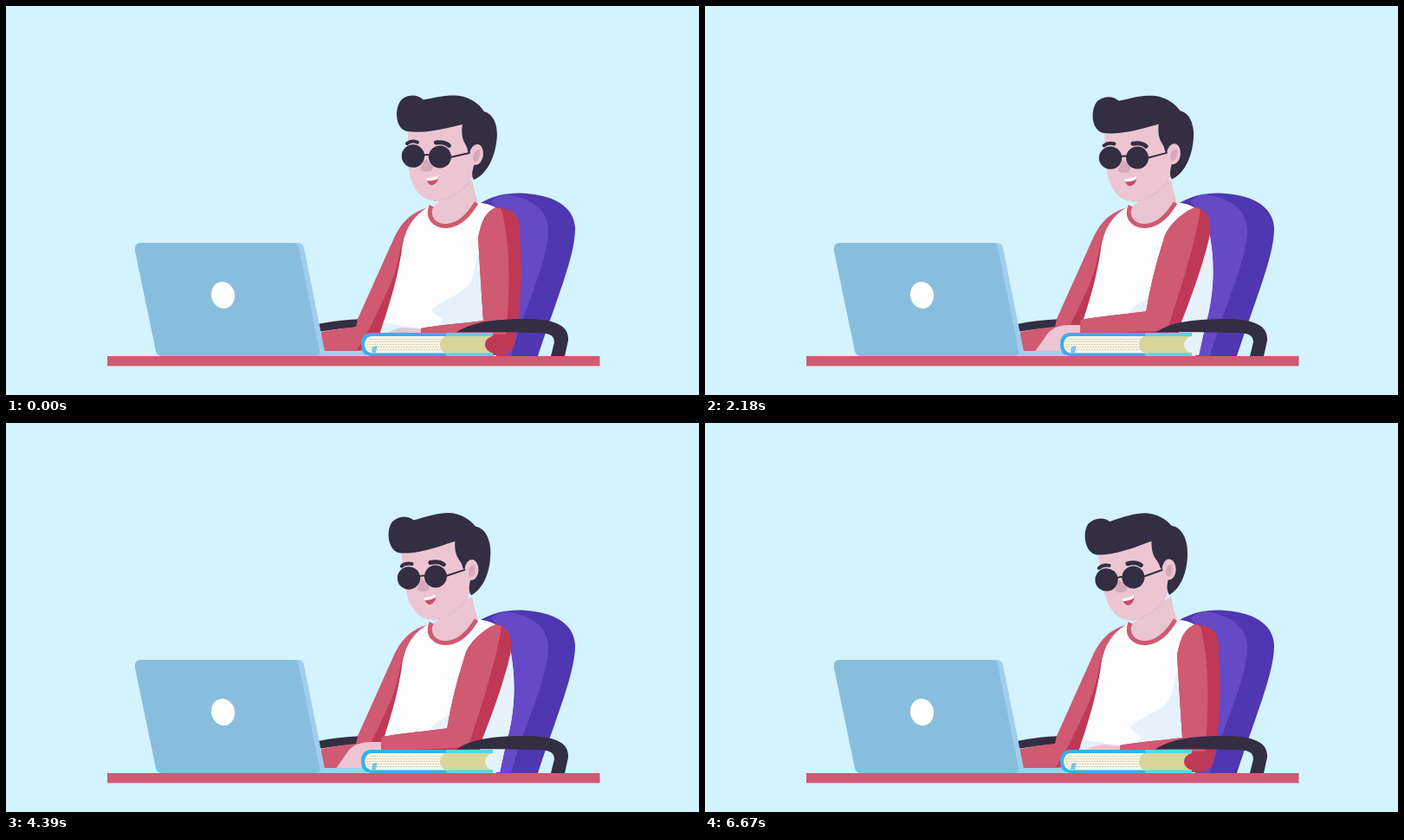
An HTML page that plays this animation: 800x450 px, repeating every 6700 ms.

```html
<!DOCTYPE html>
<html lang="en">
<head>
<meta charset="utf-8">
<title>At the desk</title>
<style>
html, body { margin: 0; width: 100%; height: 100%; overflow: hidden; background: #d3f3fe; }
svg { display: block; width: 100vw; height: 100vh; }
.light { fill: #cf5a72; }
.deep { fill: #be3955; }
.ink { fill: #332e42; }
.skin { fill: #edc5d2; }
.line { fill: none; stroke: #332e42; stroke-linecap: round; }
</style>
</head>
<body>
<svg viewBox="0 0 800 450">
  <!-- chair -->
  <path fill="#4e37b0" d="M546 229C562 219 578 216 595 216.500C633 218 657 233 657 258C657 290 634 343 614 405H566L590 300Z"/>
  <path fill="#6549c6" d="M560 226C566 221 571 219 576 218C608 222 625 236 626 258C627 294 598 350 583 405H566L578 360L568 235Z"/>
  <path class="ink" d="M360 368Q384 363 412 362V371Q384 373 360 377Z"/>

  <!-- far arm -->
  <path class="light" d="M491 232C470 237 458 248 449 266L406 362L404 371Q385 373 364 377V399H408Q422 398 436 376L462 262Z"/>
  <path class="deep" d="M462 260C454 278 454 300 443 324Q428 357 417 378L405 398H432L446 340Z"/>

  <!-- shirt and neck -->
  <path fill="#fdfdfe" d="M492 230C470 241 459 259 456.500 285C450 325 440 352 432 378L560 404H570L577 372C587 338 590 300 581 255Q574 229 543 227Q520 260 492 230Z"/>
  <path fill="#e6f1fc" d="M548 270C540 305 541 315 532 325C518 337 500 342 491 352C496 360 505 358 503 367Q494 371 482 375L550 404H570L577 372C587 338 590 300 582 262Z"/>
  <path fill="#e6f1fc" d="M436 366Q453 369 473 373L433 379Z"/>
  <path fill="#e9c4d1" d="M499 222L538 201Q540 213 544.500 227Q533 246 515 253Q496 258 489 241Q488 234 499 228Z"/>
  <path fill="none" stroke="#cf5a72" stroke-width="5" d="M491 231C485 246 496 255 509 254.500C525 253 535 241 543 227.500"/>

  <!-- head -->
  <g id="head">
    <path fill="#dbb0c2" d="M494 226Q520 223 537 202L527 199L490 222Z"/>
    <path class="skin" d="M465 135C463 165 463 190 470 207C477 221 485 225 496 225C514 223 532 211 540 195L548 150L530 128Z"/>
    <path fill="#d6a8bb" d="M484 177L478 189Q482 193 491 191L494 184Z"/>
    <path class="ink" d="M463 145C449 142 448 118 457 108C465 102 475 102 482 108.500C500 105 511 102.500 524 104C537 106 547 114 552 122C563 125 567 137 567 149C566 174 555 195 540 201C536 195 540 186 541 182L533 168C533 159 524 158 527 137C509 141 486 148 463 145Z"/>
    <ellipse class="skin" cx="543" cy="172" rx="8" ry="12" transform="rotate(8 543 172)"/>
    <path fill="#d6a8bb" d="M547 166C539 167 538 174 540 180C546 181 548 174 547 166Z"/>
    <path fill="#c94d6c" d="M484.500 199Q493 200 499.500 196.500Q499 206 491 207.500Q487 206 484.500 199Z"/>
    <path fill="#fff" d="M484.500 199Q493 199 499.500 196L498.500 200Q492 203 486 202Z"/>
    <g id="eyes">
      <path class="line" stroke-width="4" d="M463 159Q468 155 475 157.500"/>
      <path class="line" stroke-width="5" d="M496.500 158Q506 156.500 511.500 161.500"/>
      <circle class="ink" cx="470" cy="173.500" r="13.200"/>
      <circle class="ink" cx="501" cy="174.500" r="13"/>
      <path class="line" stroke-width="2" d="M482 173Q486 171 490 173M513 175L535 170"/>
    </g>
  </g>

  <!-- laptop base, near arm -->
  <path fill="#a3cfee" d="M360 399H416V405H360Z"/>
  <path id="hand" class="skin"/>
  <path id="sleeve" class="deep"/>
  <path id="front" class="light"/>

  <!-- laptop lid -->
  <path fill="#a0cdee" d="M156 274H337Q343 274 344 280L368 400Q368 405 362 405H181Q174 405 173 399L149 283Q148 274 156 274Z"/>
  <path fill="#88bedd" d="M156 274H331Q337 274 338 280L362 399Q363 405 356 405H181Q174 405 173 399L149 283Q148 274 156 274Z"/>
  <ellipse cx="250.500" cy="334.500" rx="13.500" ry="15.500" fill="#fff" transform="rotate(-12 250.500 334.500)"/>

  <!-- book -->
  <path fill="#38aeea" d="M510 378H421Q410 379 410 391.500Q410 404 421 405H510Z"/>
  <path fill="#55d5ea" d="M508 378H562V382H508ZM508 401H562V405H508Z"/>
  <path fill="#f8f5e6" d="M512 382H421Q414 384 414 391.500Q414 399 421 401.500H512Z"/>
  <path fill="none" stroke="#d5d0b4" stroke-width="1" stroke-dasharray="2 1" d="M419 385.500H502M417 388.500H500M416 391.500H500M417 394.500H500M419 397.500H502"/>
  <path fill="#7cc5e6" d="M423 394L428.500 393L427 401.500H422Z"/>
  <path fill="#d8d49c" d="M507 382H561Q553 385 553 391.500Q553 398 561 401.500H507Q501 398 501 391.500Q501 385 507 382Z"/>

  <path class="ink" d="M520 377.500C540 364 569 362 605 362C637 363 650 371 649 387L645 405H629L633 389C633 380 626 378 611 378C575 377 548 377 520 377.500Z"/>
  <rect class="light" x="117" y="405" width="568.500" height="11.500"/>
</svg>
<script>
const $ = id => document.getElementById(id);
const LOOP = 6700;
const PULL = 1.55; // arm reach: 0 is at the keys, 1 at rest, PULL drawn back

// Time and reach at the end of each forward stroke
const strokes = [[0, 1], [670, -.13], [1520, -.13], [2110, -.13], [2820, .71],
  [3570, .7], [4310, -.13], [5125, -.13], [5650, 1]];

const mix = (a, b, k) => a + (b - a) * k;
const ease = k => (1 - Math.cos(Math.PI * Math.min(k, 1))) / 2;

// Between two strokes the arm draws back, then moves forward again.
function reachAt(t) {
  const i = strokes.findIndex(s => s[0] > t);
  if (i < 0) return 1;
  const [t0, from] = strokes[i - 1], [t1, to] = strokes[i];
  const k = 2 * (t - t0) / (t1 - t0);
  return k < 1 ? mix(from, PULL, ease(k)) : mix(PULL, to, ease(k - 1));
}

function drawArm(reach) {
  // A point that shifts by (dx, dy) per unit of reach
  const p = (x, y, dx, dy) => `${x + dx * reach} ${y + dy * reach} `;
  const inner = 'M566 233C552 238 ' + p(532, 255, 16, -2) + p(529, 270, 16, -2) +
    'Q' + p(514, 315, 34, 5) + p(508, 353, 43, 11) +
    'C' + p(488, 356, 43, 11) + p(457, 358, 47, 10) + p(432, 363, 47, 10);

  $('sleeve').setAttribute('d', inner + 'V404L' + p(526, 404, 42, 0) +
    'C' + p(541, 404, 42, 0) + p(546, 395, 42, 0) + p(546, 372, 42, 13) +
    'Q' + p(575, 300, 23, 30) + p(583, 262, 10, 0) +
    'C' + p(584, 246, 10, 0) + p(579, 234, 10, 0) + '566 233Z');
  $('front').setAttribute('d', inner + 'V380L' + p(532, 375, 45, 5) +
    'Q' + p(566, 275, 20, 15) + '572 235Z');
  $('hand').setAttribute('d', 'M' + p(435, 369, 47, 5) +
    'C' + p(414, 369, 47, 2) + p(401, 368, 47, 2) + p(392, 382, 45, 0) +
    'L' + p(380, 399, 47, 0) + 'L' + p(435, 399, 47, 0) + 'Z');
}

function draw(now) {
  const t = now % LOOP;
  // The head nods slowly, then snaps upright.
  const nod = ease((t + 100) % 1700 / 1620);
  $('head').setAttribute('transform', `rotate(${-7 * nod} 519 231)`);
  $('eyes').setAttribute('transform', `translate(0 ${1.5 * nod})`);
  drawArm(reachAt(t));
  requestAnimationFrame(() => draw(performance.now() - start));
}

const start = performance.now();
draw(0);
</script>
</body>
</html>
```
